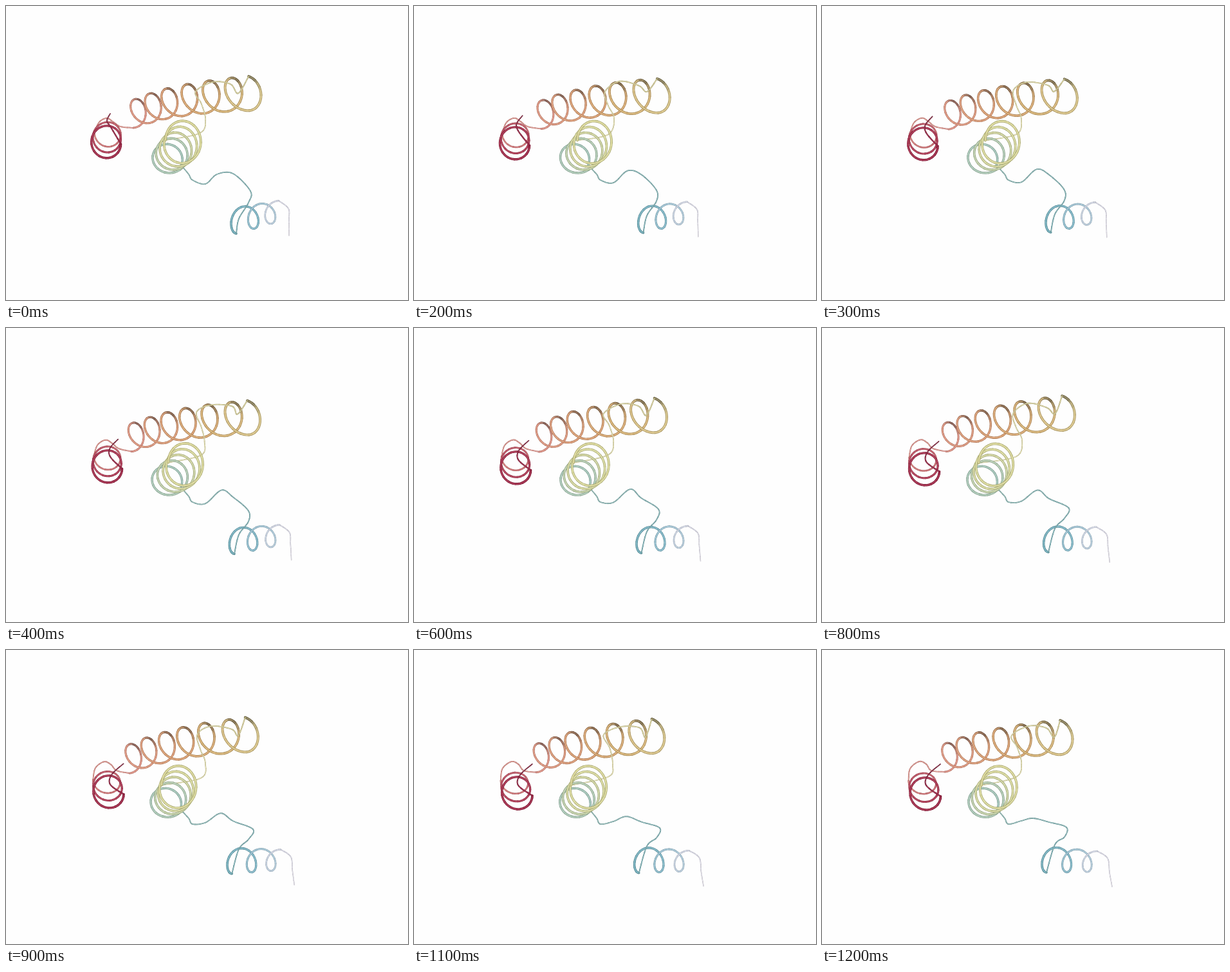
An HTML page with a canvas for the animation above (1300 ms loop, 625 px wide and 456 px high).

```html
<!DOCTYPE html>
<html lang="en">
<head>
<meta charset="utf-8">
<title>Helix chain</title>
<style>
html, body { margin: 0; width: 100%; height: 100%; overflow: hidden; background: #fefefe; }
canvas { display: block; width: 625px; height: 456px; }
</style>
</head>
<body>
<canvas id="stage" width="625" height="456"></canvas>
<script>
const ctx = document.getElementById('stage').getContext('2d');
const STEP = 100, LOOP = 1300;
const { PI, sin, cos, min, max } = Math;

const lerp = (a, b, k) => a + (b - a) * k;
const mix = (a, b, k) => a.map((n, i) => lerp(n, b[i], k));
const rgb = hex => [1, 3, 5].map(i => parseInt(hex.slice(i, i + 2), 16));
const tip = pts => pts[pts.length - 1];

// Turns an ellipse while at(u) moves and resizes it; u counts the turns.
function coil(turns, from, dir, at) {
  const n = Math.round(turns * 40), out = [];
  for (let i = 0; i <= n; i++) {
    const u = turns * i / n, a = from + dir * 2 * PI * u;
    const { x, y, rx, ry, lean = 0, shade = 0 } = at(u, i / n);
    out.push([x + rx * cos(a) + lean * sin(a), y + ry * sin(a), shade * max(0, -sin(a)) ** 4]);
  }
  return out;
}

// Smooth line through points given as x, y pairs.
function thread(v, before, after) {
  const p = [];
  for (let i = 0; i < v.length; i += 2) p.push([v[i], v[i + 1]]);
  if (before) p.unshift(before);
  if (after) p.push(after);
  const at = i => p[max(0, min(p.length - 1, i))];
  const out = [];
  for (let i = 0; i < p.length - 1; i++) {
    const [a, b, c, d] = [at(i - 1), at(i), at(i + 1), at(i + 2)];
    for (let j = i ? 1 : 0; j <= 8; j++) {
      const t = j / 8;
      const f = m => b[m] + t / 2 * (c[m] - a[m] + t * (2 * a[m] - 5 * b[m] + 4 * c[m] - d[m]
        + t * (3 * (b[m] - c[m]) + d[m] - a[m])));
      out.push([f(0), f(1), 0]);
    }
  }
  return out;
}

function line(pts, from, to, width, color) {
  ctx.beginPath();
  for (let i = from; i <= to; i++) ctx.lineTo(pts[i][0], pts[i][1]);
  ctx.lineWidth = width;
  ctx.strokeStyle = `rgb(${color.map(Math.round)})`;
  ctx.stroke();
}

// Dark rim with a lighter core, coloured along its length.
function tube(pts, w0, w1, ...stops) {
  const c = stops.map(rgb), last = pts.length - 1;
  for (let i = 0; i < last; i += 3) {
    const to = min(last, i + 3), k = (i + to) / 2 / last;
    const q = k * (c.length - 1), s = min(c.length - 2, Math.floor(q));
    const base = mix(c[s], c[s + 1], q - s).map(n => n * (1 - pts[to][2]));
    const width = lerp(w0, w1, k);
    line(pts, i, to, width, base.map(n => n * 0.8));
    line(pts, max(0, i - 1), to, width * 0.5, base.map(n => lerp(n, 255, 0.18)));
  }
}

// p runs from 0 to 1 over the loop: each part drifts, swells and sways with it.
function draw(p) {
  const swell = sin(PI * p), wave = sin(2 * PI * p), settle = 1 - (1 - p) ** 2;
  const sway = i => sin(4 * PI * p + i * 1.9);

  const red = coil(2.5, 0, 1, (u, k) => ({
    x: lerp(155 + 6 * p, 158 - 3 * p, k),
    y: lerp(214 + 13 * p, 196 + 7 * p, k),
    rx: lerp(23.5, 20.5, k),
    ry: lerp(24, 20 - 3 * p, k)
  }));

  const orange = coil(6.46, PI / 2, -1, u => {
    const v = min(u, 6) - 0.5;
    return {
      x: 202 + 22 * v + 1.6 * v * v + 3.5 * cos(PI * p) + sway(u),
      y: 169 - 8.8 * u + 0.55 * u * u + lerp(3 * swell, 4 * wave, u / 6),
      rx: 16.5 + 0.9 * u, ry: 20 + 1.05 * u, lean: 3, shade: 0.45
    };
  });

  const yellow = coil(4.55, PI, 1, (u, k) => ({
    x: lerp(276 + 6 * wave, 248, k ** 1.3) + sway(u),
    y: lerp(208 + 2 * p, 240, k),
    rx: lerp(28, 25, k), ry: lerp(32, 23, k)
  }));

  const teal = coil(2.5, PI / 2, 1, (u, k) => ({
    x: lerp(358 - 9 * p, 424 + 4 * p, k),
    y: lerp(333 - 8 * p, 318 + 10 * p, k),
    rx: 14, ry: lerp(20, 16, k)
  }));

  const head = thread(mix([162,167, 157,178, 163,188], [184,177, 165,194, 162,210], settle), null, red[0]);
  const neck = thread(mix([145,180, 157,174, 167,180, 178,187], [137,184, 151,173, 162,177, 170,187], p),
    tip(red), orange[0]);
  const bridge = thread([361,134, 350,122, 320,118, 296,132, 303,153, 310,176, 302,198]
    .map((n, i) => n + 1.5 * sway(i)), tip(orange), yellow[0]);
  const strand = thread([
    284, 261, 290, 270, 310, 276 - 11 * p,
    328 + 8 * swell, 261 - 11 * swell,
    353, 260 + 7 * p,
    380 - 4 * wave, 287 - 12 * p,
    377, 305 - 15 * p, 362, 330 - 28 * p
  ], tip(yellow), teal[0]);
  const end = thread(mix([439,314, 440,331, 440,356], [444,323, 447,345, 451,367], p), tip(teal));

  ctx.fillStyle = '#fefefe';
  ctx.fillRect(0, 0, 625, 456);
  ctx.lineJoin = ctx.lineCap = 'round';
  tube(end, 1.8, 1.4, '#dcdcec', '#e4e0ea');
  tube(teal, 3.6, 2.4, '#64a8b6', '#78b6c8', '#a6c8da', '#d4d8e8');
  tube(strand, 1.8, 1.8, '#8ebab4', '#74acb2');
  tube(orange, 3, 4, '#e08a7c', '#de9470', '#da9a66', '#d6ac68', '#d8c684');
  tube(bridge, 2, 1.6, '#d4cc92', '#e4e0ac');
  tube(yellow.reverse(), 3.4, 3.8, '#9cc4b8', '#adcab0', '#d0d498', '#dada96', '#dad690');
  tube(neck, 1.8, 2, '#dd8c84', '#e0948c');
  tube(red.reverse(), 2.4, 3.6, '#d87c76', '#ae2a48', '#981236');
  tube(head, 1.6, 2.4, '#7c2038', '#941236');
}

const start = performance.now();
let shown = -1;
function tick(now) {
  const step = Math.floor((max(0, now - start) % LOOP) / STEP);
  const pose = step === 5 ? 4 : step; // one step of rest
  if (pose !== shown) draw((shown = pose) / 12);
  requestAnimationFrame(tick);
}
tick(start);
</script>
</body>
</html>
```
